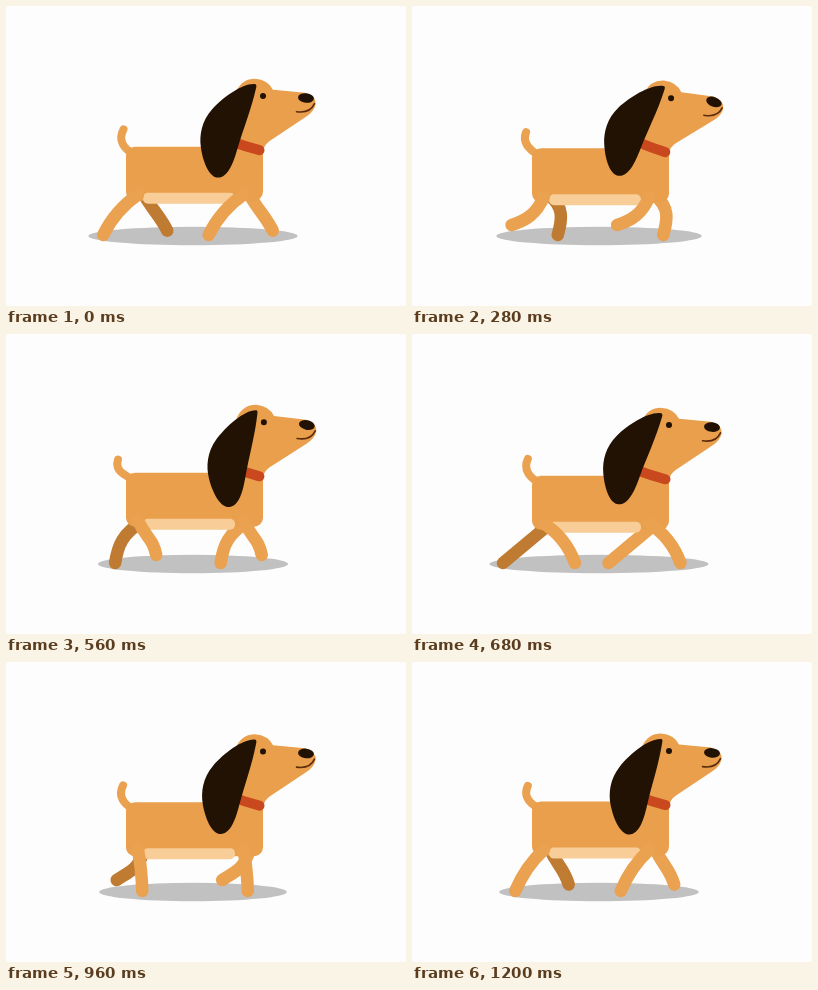
Write an HTML page that moves like this. It is 400 px wide and 300 px high and loops after 1240 ms.

```html
<!DOCTYPE html>
<html lang="en">
<head>
<meta charset="utf-8">
<title>Walking dog</title>
<style>
  html, body { margin: 0; width: 100%; height: 100%; overflow: hidden; background: #fdfdfd; }
  svg { display: block; width: 100vw; height: 100vh; }
  .limb { fill: none; stroke: #eaa150; stroke-width: 12.5; stroke-linecap: round; stroke-linejoin: round; }
  .dark { stroke: #be7b31; }
  .tail { stroke-width: 8; }
  .coat { fill: #e99f4c; }
  .ink { fill: #211204; }
</style>
</head>
<body>
<svg viewBox="0 0 400 300">
  <ellipse id="shadow" cx="187" cy="230" ry="9.3" fill="#c1c1c1"/>
  <path id="farHind" class="limb dark"/>
  <path id="farFront" class="limb"/>
  <path id="tail" class="limb tail"/>
  <g id="trunk">
    <rect class="coat" x="120" y="141" width="137" height="54" rx="9"/>
    <rect x="137" y="187" width="92" height="11" rx="5" fill="#f8cd97"/>
  </g>
  <path id="nearHind" class="limb"/>
  <path id="nearFront" class="limb"/>
  <g id="head">
    <path class="coat" d="M212 150 L230 86 Q236 73 249 73 Q262 74 267 84 L299 87 Q311 91 309.5 99 Q308 106 300 111 L264 135 Q258 139 257 146 V160 H212 Z"/>
    <path d="M225 135.5 Q240 141 253.5 144.5" fill="none" stroke="#c9481d" stroke-width="10" stroke-linecap="round"/>
    <circle class="ink" cx="257" cy="90.300" r="3"/>
    <ellipse id="nose" class="ink" cx="300" cy="92.300" rx="8" ry="4.800"/>
    <path d="M290.500 106 Q304 108 308.500 98" fill="none" stroke="#5a2c0c" stroke-width="1.600" stroke-linecap="round"/>
    <path id="ear" class="ink" d="M249.500 78.500 C238 77 218 92 207 105 C197 117 195 131 197 143 C200 160 207 173 215 173 C225 173 230 158 233.500 144 C239 123 246 104 250 83 Q251 79 249.500 78.500 Z"/>
  </g>
</svg>
<script>
const STEP = 40, LOOP = 1240, CYCLE = 30, HALF = 15;
const FRONT = 105.5;             // hind legs to front legs
const BACK = 91, REACH = 72;     // rearmost foot place, stride length
const TAU = 2 * Math.PI;
const { sin, cos, min, max, abs, PI } = Math;
const $ = id => document.getElementById(id);
const set = (id, name, value) => $(id).setAttribute(name, value);
const smooth = u => u * u * (3 - 2 * u);

// Swing forward through one half of the cycle, push back through the other.
// knee: how far the leg buckles while it carries weight.
function gait(step, hip, knee) {
  const at = (step - 1 + CYCLE) % CYCLE, u = at % HALF / HALF;
  const swing = at < HALF;
  const x = BACK + REACH * (swing ? smooth(u ** 1.4) : 1 - u ** 1.3);
  const lift = swing ? 11 * sin(PI * u) ** .6 : 0;
  const lean = (x - BACK) / REACH * 2 - 1;
  const bow = swing
    ? { x1: 4 * sin(PI * u), y1: .8 * lift, x2: 4 * sin(PI * u), y2: 6 * sin(TAU * u) }
    : { x1: 4 * lean + knee * sin(TAU * u), y1: -4 * abs(lean),
        x2: 4 * lean + knee * sin(TAU * u) / 2, y2: -4 * abs(lean) };
  return { hip, x, y: 229 - lift, ...bow };
}

function leg(id, g, bob, dx) {
  const top = 189 + bob, w = g.x - g.hip, h = g.y - top;
  const bend = (part, bx, by) => `${g.hip + w * part + bx + dx} ${top + h * part + by}`;
  set(id, 'd', `M${bend(0, 0, 0)} C${bend(1 / 3, g.x1, g.y1)} ${bend(2 / 3, g.x2, g.y2)} ${bend(1, 0, 0)}`);
}

function draw(step) {
  const beat = sin(TAU * step / HALF);
  const wag = cos(2 * TAU * step / HALF);
  const nod = 2.5 * max(0, sin(TAU * step / CYCLE));
  const bob = 2.7 * beat - .3;
  const near = gait(step, 132, 0);
  const far = gait((step + HALF) % CYCLE, 138, 11);

  set('shadow', 'rx', 88 + .8 * (118 - min(near.x, far.x)));
  leg('farHind', far, bob, 0);
  leg('farFront', far, bob, FRONT);
  leg('nearHind', near, bob, 0);
  leg('nearFront', near, bob, FRONT);

  const tx = 112.5 + 5 * wag, ty = 126.5 - 3 * wag + bob / 2;
  set('tail', 'd', `M127 ${148 + bob} C118 ${143 + bob} ${tx * .55 + 47} ${ty + 11} ${tx} ${ty}`);
  set('trunk', 'transform', `translate(0 ${bob})`);
  set('head', 'transform', `translate(0 ${bob}) rotate(${nod} 245 140)`);
  set('nose', 'transform', `rotate(${6 + 5 * nod} 300 92.3)`);
  set('ear', 'transform', `rotate(${2 + 8.5 * beat - nod} 248 80)`);
}

// The first pose is held for two steps.
function tick(now) {
  draw(max(0, Math.floor(now % LOOP / STEP) - 1));
  requestAnimationFrame(tick);
}
draw(0);
requestAnimationFrame(tick);
</script>
</body>
</html>
```
